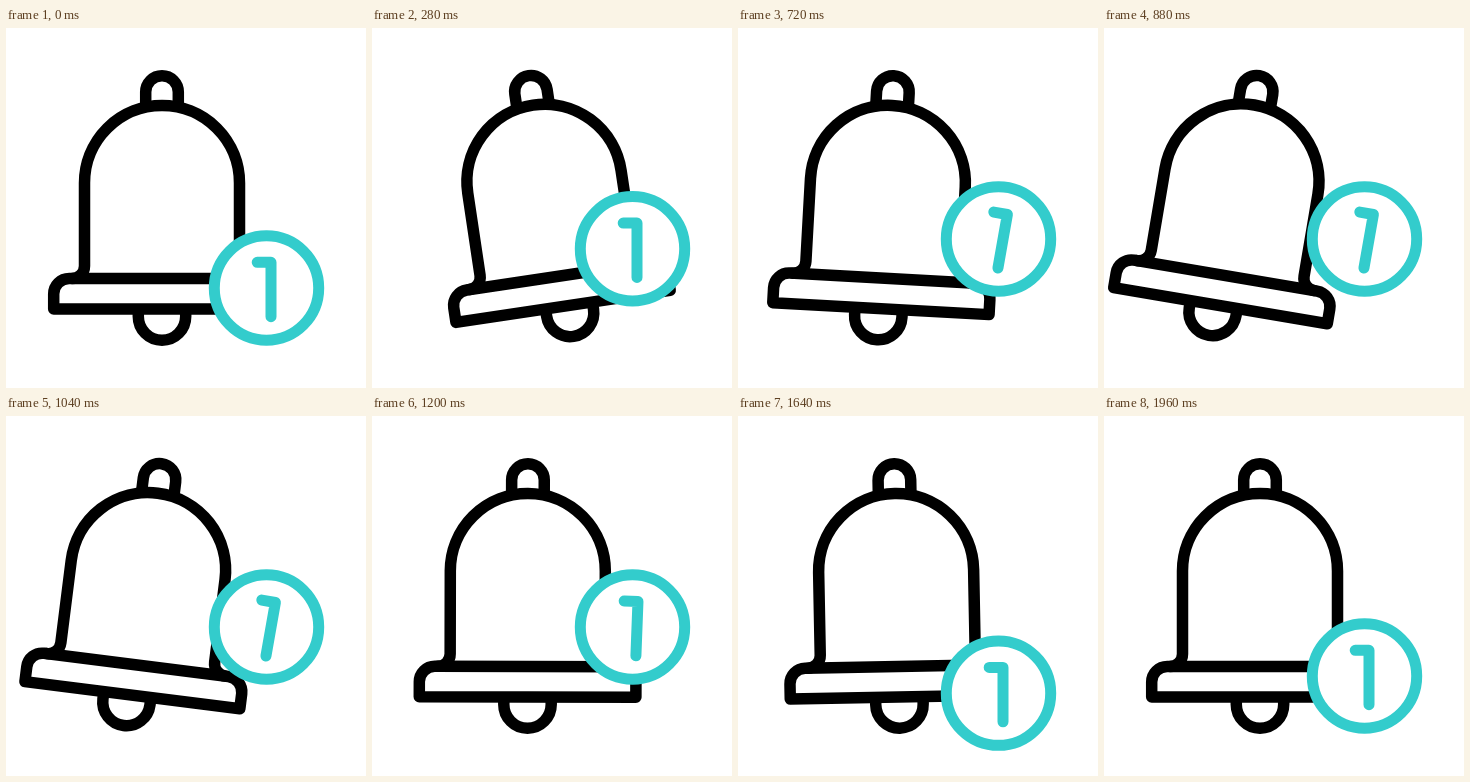
Animation, 360 px wide and 360 px high, one loop 2000 ms. Source, as an HTML page with a canvas:

```html
<!DOCTYPE html>
<html lang="en">
<head>
<meta charset="utf-8">
<title>Notification bell</title>
<style>
  html, body { margin: 0; width: 100%; height: 100%; overflow: hidden; background: #fff; }
  canvas { display: block; width: 360px; height: 360px; }
</style>
</head>
<body>
<canvas id="stage" width="360" height="360"></canvas>
<script>
const ctx = document.getElementById('stage').getContext('2d');
const LOOP = 2000, STEP = 40;
const TEAL = '#33cccc';
const CX = 156, PIVOT_Y = 44;
const BADGE_X = 260.5, BADGE_Y = 260, RISE = 49;

const rad = deg => deg * Math.PI / 180;

// Smooth 0 to 1 over the given span
function ease(t, start, span) {
  const u = Math.min(1, Math.max(0, (t - start) / span));
  return u * u * (3 - 2 * u);
}

// 0 to 1 with one overshoot
const spring = (t, start) => 1.35 * ease(t, start, 320) - 0.35 * ease(t, start + 320, 120);

// Overlapping swings: left, right, left, back to rest
const bellAngle = t =>
  -9.5 * ease(t, 0, 350) + 21 * ease(t, 350, 650)
  - 14.5 * ease(t, 870, 470) + 3 * ease(t, 1180, 780);

const badgeY = t => BADGE_Y - RISE * (spring(t, 100) - spring(t, 1320));

const digitAngle = t => 10 * (ease(t, 540, 160) - ease(t, 1060, 200));

function bell(angle) {
  ctx.save();
  ctx.translate(CX, PIVOT_Y);
  ctx.rotate(rad(angle));
  ctx.translate(0, -PIVOT_Y);
  ctx.strokeStyle = '#000';
  ctx.lineWidth = 11.5;

  // handle
  ctx.beginPath();
  ctx.moveTo(-16.3, 76);
  ctx.arc(0, 64, 16.3, Math.PI, 0);
  ctx.lineTo(16.3, 76);
  ctx.stroke();

  // body
  ctx.beginPath();
  ctx.moveTo(-90, 250.5);
  ctx.arcTo(-77.5, 250.5, -77.5, 238, 12.5);
  ctx.arc(0, 155, 77.5, Math.PI, 0);
  ctx.arcTo(77.5, 250.5, 90, 250.5, 12.5);
  ctx.stroke();

  // rim
  ctx.beginPath();
  ctx.moveTo(-108.3, 281);
  ctx.arcTo(-108.3, 250.5, -92, 250.5, 15.5);
  ctx.arcTo(108.3, 250.5, 108.3, 281, 15.5);
  ctx.lineTo(108.3, 281);
  ctx.closePath();
  ctx.stroke();

  // clapper slides along the rim
  ctx.translate(-0.7 * angle, 0);
  ctx.beginPath();
  ctx.moveTo(-23.7, 283);
  ctx.arc(0, 288.5, 23.7, Math.PI, 0, true);
  ctx.lineTo(23.7, 283);
  ctx.stroke();
  ctx.restore();
}

function badge(y, angle) {
  ctx.save();
  ctx.translate(BADGE_X, y);
  ctx.strokeStyle = TEAL;
  ctx.fillStyle = '#fff';
  ctx.lineWidth = 11;
  ctx.beginPath();
  ctx.arc(0, 0, 52.2, 0, 2 * Math.PI);
  ctx.fill();
  ctx.stroke();

  ctx.rotate(rad(angle));
  ctx.beginPath();
  ctx.moveTo(-9.3, -25.7);
  ctx.lineTo(4.5, -25.7);
  ctx.lineTo(4.5, 28.7);
  ctx.stroke();
  ctx.restore();
}

function draw(t) {
  ctx.fillStyle = '#fff';
  ctx.fillRect(0, 0, 360, 360);
  ctx.lineCap = ctx.lineJoin = 'round';
  bell(bellAngle(t));
  badge(badgeY(t), digitAngle(t));
}

const start = performance.now();
function tick() {
  const t = (performance.now() - start) % LOOP;
  draw(Math.floor(t / STEP) * STEP);
  requestAnimationFrame(tick);
}
tick();
</script>
</body>
</html>
```
